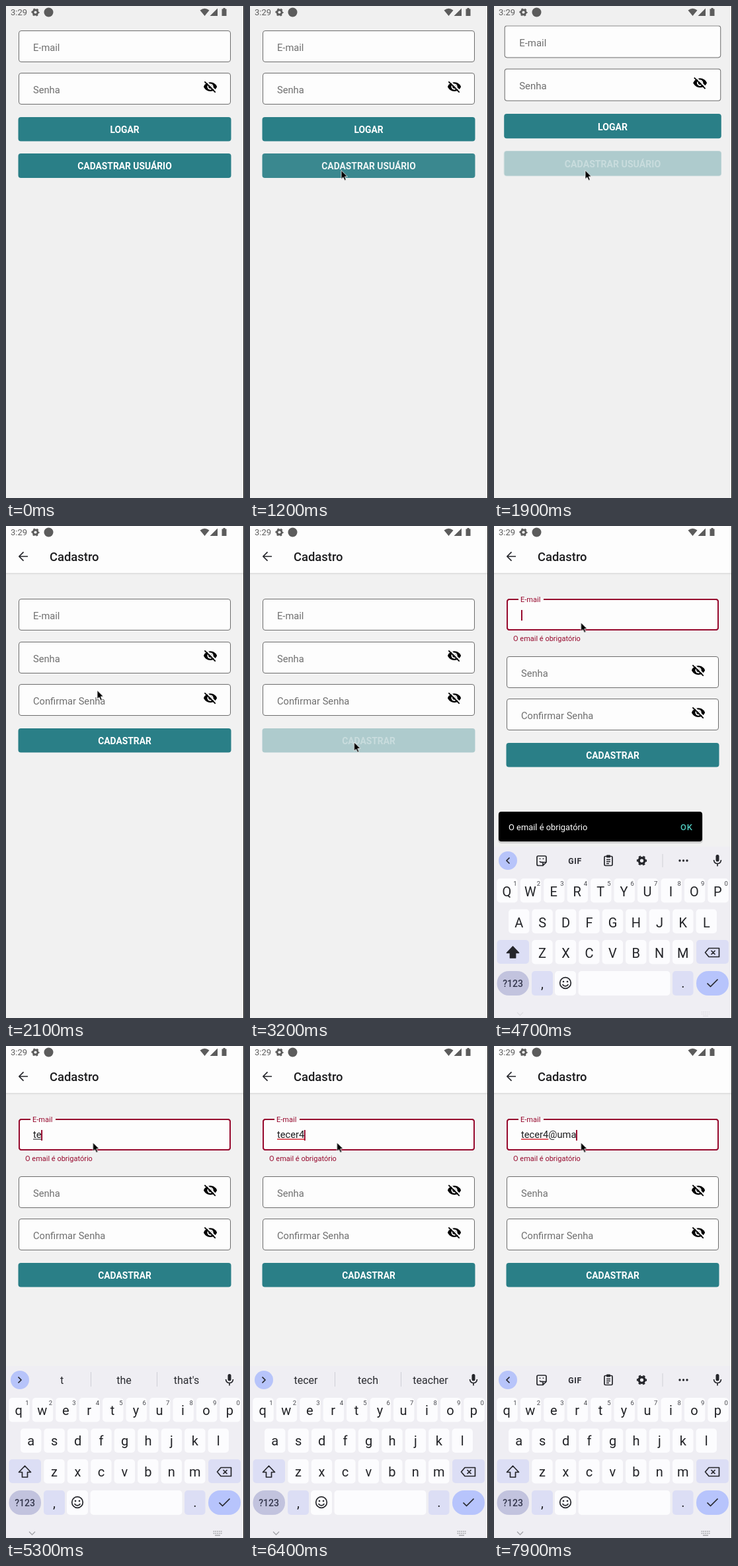
These frames come from a looping animation (360 px wide and 744 px high, 8000 ms). An HTML page:

```html
<!DOCTYPE html>
<html lang="pt-BR">
<head>
<meta charset="utf-8">
<title>Cadastro</title>
<style>
  html, body { margin: 0; width: 100%; height: 100%; overflow: hidden; background: #f0f0f0; }
  svg { display: block; width: 100vw; height: 100vh; }
  text { font: 14.7px Roboto, "Noto Sans", sans-serif; fill: #6f6f6f; }
  .mid { text-anchor: middle; }
  .box { fill: #fdfdfd; stroke: #6d6d6d; rx: 3.5px; }
  .btn rect { fill: #2a7f87; rx: 4px; }
  .btn text { font-size: 13.85px; font-weight: 700; fill: #fff; }
  .line { fill: none; stroke: #25262b; stroke-width: 1.7; stroke-linejoin: round; }
  .ink { fill: #25262b; }
  .grey { fill: #5c5c5c; }
  #title { font-size: 18.4px; font-weight: 500; fill: #1d1d1f; }
  #caption { font-size: 11px; fill: #970a2e; }
  #typed { fill: #1d1d1f; white-space: pre; }
  #snack text { font-size: 12.9px; fill: #fff; }
  #snack .ok { font-weight: 500; letter-spacing: .9px; fill: #4fc9bd; }
  .cap { fill: #fcfcfe; rx: 5px; }
  .soft { fill: #dcdef5; }
  .pill { rx: 18px; }
  .letter { font-size: 20px; fill: #222327; text-anchor: middle; }
  .digit { font-size: 9.5px; fill: #44454b; text-anchor: middle; }
  .word { font-size: 16px; fill: #2b2c31; text-anchor: middle; }
  #gifKey { font-size: 12.3px; font-weight: 700; letter-spacing: .6px; fill: #303137; }
  #modeKey { font-size: 14px; font-weight: 500; fill: #33364c; }

  .anim, .press > * { animation: 8s linear infinite; }
  .step { animation-timing-function: step-end; }

  #pointer { animation-name: pointer; }
  @keyframes pointer {
    0% { opacity: 0; transform: translate(60px, 378px); animation-timing-function: step-end; }
    1.1% { opacity: 1; transform: translate(60px, 378px); animation-timing-function: ease-out; }
    5%, 10.6% { transform: translate(125px, 295px); animation-timing-function: ease-in-out; }
    12.4%, 28.75% { transform: translate(138px, 248.5px); animation-timing-function: ease-in-out; }
    34%, 46.8% { transform: translate(157.5px, 327px); animation-timing-function: ease-in-out; }
    52.4%, 100% { opacity: 1; transform: translate(131.5px, 146px); }
  }

  #openBtn > * { animation-name: openPress; }
  @keyframes openPress { 0%, 14.6% { opacity: 1; } 18%, 100% { opacity: .33; } }
  #sendBtn > * { animation-name: sendPress; }
  @keyframes sendPress { 0%, 34.6% { opacity: 1; } 37.5%, 42% { opacity: .33; } 44.4%, 100% { opacity: 1; } }

  #login { transform-origin: 180px 408px; animation-name: leave; }
  @keyframes leave { 0%, 22.6% { transform: scale(1); } 23.75% { transform: scale(1.02); } 26%, 100% { transform: scale(1.08); } }
  #register { transform-origin: 180px 408px; animation-name: enter; }
  @keyframes enter {
    0%, 23.85% { opacity: 0; transform: scale(.9); animation-timing-function: ease-out; }
    26.1%, 100% { opacity: 1; transform: scale(1); }
  }

  #lower { animation-name: lower; }
  @keyframes lower { 0% { transform: none; } 42.2%, 100% { transform: translateY(22px); } }
  #caption { animation-name: caption; }
  @keyframes caption { 0% { opacity: 0; } 42.2%, 100% { opacity: 1; } }
  #mailBox { animation-name: mailBox; }
  @keyframes mailBox { 0% { stroke: #6d6d6d; } 42.2%, 100% { stroke: #970a2e; } }
  #mailLabel { animation-name: mailLabel; }
  @keyframes mailLabel {
    0% { fill: #6f6f6f; transform: translate(41px, 140.5px); animation-timing-function: step-end; }
    42.2%, 56.2% { fill: #970a2e; transform: translate(41px, 140.5px); }
    58.1%, 100% { fill: #970a2e; transform: translate(40px, 115px) scale(.75); }
  }
  .focus { animation-name: focus; }
  @keyframes focus { 0% { opacity: 0; } 56.2%, 100% { opacity: 1; } }

  #lift { animation-name: lift; }
  @keyframes lift {
    0%, 56.2% { transform: none; animation-timing-function: ease-out; }
    58.4%, 100% { transform: translateY(-260px); }
  }
  #snack { transform-origin: 161px 714px; animation-name: snack; }
  @keyframes snack {
    0%, 42.3% { opacity: 0; transform: scale(.9); }
    44.7%, 63.5% { opacity: 1; transform: none; }
    65.5%, 100% { opacity: 0; transform: none; }
  }

  #keyboard { animation-name: keyboard; }
  @keyframes keyboard {
    0%, 56.2% { transform: translateY(260px); animation-timing-function: ease-out; }
    58.4%, 59% { transform: none; }
    61%, 100% { transform: translateY(-1px); }
  }
  #nav { animation-name: nav; }
  @keyframes nav { 0%, 58.7% { opacity: .2; } 66%, 100% { opacity: 1; } }
  .upper { animation-name: upper; }
  @keyframes upper { 0% { opacity: 1; } 63.2%, 100% { opacity: 0; } }
  .lowercase { animation-name: lowercase; }
  @keyframes lowercase { 0% { opacity: 0; } 63.2%, 100% { opacity: 1; } }
  #shift { animation-name: shift; }
  @keyframes shift { 0% { fill: #25262b; } 63.2%, 100% { fill: transparent; } }
  #tools { animation-name: tools; }
  @keyframes tools { 0% { opacity: 1; } 63.2% { opacity: 0; } 85.8%, 100% { opacity: 1; } }
  #words { animation-name: words; }
  @keyframes words { 0% { opacity: 0; } 63.2% { opacity: 1; } 85.8%, 100% { opacity: 0; } }
  #chevron { transform-origin: 21px 506px; animation-name: chevron; }
  @keyframes chevron { 0% { transform: none; } 63.2% { transform: scaleX(-1); } 85.8%, 100% { transform: none; } }
</style>
</head>
<body>
<svg viewBox="0 0 360 744">
  <defs>
    <linearGradient id="shade" x2="0" y2="1">
      <stop stop-color="#d9d9d9"/><stop offset="1" stop-color="#f1f1f1"/>
    </linearGradient>
    <g id="eye">
      <path d="M1 12C2.7 7.6 7 4.5 12 4.5S21.3 7.6 23 12C21.3 16.4 17 19.5 12 19.5S2.7 16.4 1 12Z"/>
      <circle cx="12" cy="12" r="5" fill="#fdfdfd"/>
      <circle cx="12" cy="12" r="3"/>
      <path d="M4 1.6L22.4 20" stroke="#fdfdfd" stroke-width="2.2"/>
      <path d="M2.6 3.6L20.4 21.4" stroke="#000" stroke-width="1.9"/>
    </g>
    <g id="gear" fill="none">
      <circle r="3.5" stroke-width="2.8"/>
      <circle r="5.3" stroke-width="1.6" stroke-dasharray="2.8 2.75" stroke-dashoffset="1.4"/>
    </g>
  </defs>

  <rect width="360" height="744" fill="#f0f0f0"/>

  <g id="login" class="anim">
    <g id="loginFields"></g>
    <g class="btn"><rect x="18.5" y="168" width="322" height="36.5"/><text class="mid" x="179.5" y="192">LOGAR</text></g>
    <g class="btn press" id="openBtn"><rect x="18.5" y="223" width="322" height="37"/><text class="mid" x="179.5" y="247">CADASTRAR USUÁRIO</text></g>
  </g>

  <g id="register" class="anim">
    <rect x="-30" y="-60" width="420" height="860" fill="#f1f1f1"/>
    <rect x="-30" y="-60" width="420" height="131" fill="#fdfdfd"/>
    <rect y="71" width="360" height="3" fill="url(#shade)"/>
    <path class="line" d="M33 46H20M26.5 39.3L19.8 46L26.5 52.7"/>
    <text id="title" x="66" y="53">Cadastro</text>

    <rect id="mailBox" class="box anim step" x="19.5" y="110.5" width="320" height="47"/>
    <g class="focus anim step">
      <rect x="20" y="111" width="319" height="46" rx="3.5" fill="none" stroke="#970a2e" stroke-width="2"/>
      <rect x="37" y="109" width="38" height="4" fill="#f7f7f7"/>
      <rect id="caret" x="41" y="127" width="2" height="16" fill="#970a2e"/>
    </g>
    <text id="mailLabel" class="anim">E-mail</text>
    <text id="caption" class="anim step" x="29" y="174">O email é obrigatório</text>
    <path id="spell" fill="none" stroke-width="1.4"/>
    <text id="typed" x="41" y="139"></text>

    <g id="lower" class="anim step">
      <g id="passFields"></g>
      <g class="btn press" id="sendBtn"><rect x="18.5" y="306" width="322" height="36.5"/><text class="mid" x="179.5" y="330">CADASTRAR</text></g>
    </g>
  </g>

  <g id="lift" class="anim">
    <g id="snack" class="anim">
      <rect x="6" y="693" width="310" height="47" rx="5" opacity=".14"/>
      <rect x="7" y="692" width="308" height="45" rx="4"/>
      <text x="22" y="720">O email é obrigatório</text>
      <text class="ok" x="282" y="720">OK</text>
    </g>
  </g>

  <g id="keyboard" class="anim">
    <rect y="485" width="360" height="262" fill="#efeef3"/>
    <circle cx="21" cy="506" r="14" fill="#b7c4fa"/>
    <path id="chevron" class="line anim step" d="M23.5 501.5L19 506L23.5 510.5"/>
    <g id="tools" class="anim step">
      <g class="line">
        <path d="M74 513.5H67Q65 513.5 65 511.5V501Q65 499 67 499H77Q79 499 79 501V508.5L74 513.5V508.5H79M69 507Q71 509.5 73.5 508"/>
        <path d="M69.5 502.5V504M74.5 502.5V504"/>
        <rect x="167" y="499.5" width="12" height="14" rx="1.5"/>
        <path d="M170 504.5H176M170 507.5H176M170 510.5H174" stroke-width="1.3"/>
      </g>
      <rect class="ink" x="170" y="497.5" width="6" height="4" rx="1"/>
      <text id="gifKey" class="mid" x="122.5" y="510.5">GIF</text>
      <use href="#gear" transform="translate(223.5 506) scale(1.25)" stroke="#25262b"/>
      <rect x="254.5" y="496" width="1" height="20" fill="#cfcfd6"/>
      <g class="ink"><circle cx="281" cy="506" r="1.7"/><circle cx="286.5" cy="506" r="1.7"/><circle cx="292" cy="506" r="1.7"/></g>
    </g>
    <g id="words" class="anim step">
      <text class="word" x="84.5" y="512"></text>
      <text class="word" x="178.5" y="512"></text>
      <text class="word" x="273" y="512"></text>
      <path d="M128.5 494V516M228.5 494V516" stroke="#cfcfd6"/>
    </g>
    <rect class="ink" x="335.5" y="497" width="5" height="10.5" rx="2.5"/>
    <path class="line" d="M332.5 505Q333 510.5 338 510.5T343.5 505M338 510.5V514.5"/>

    <g id="keys"></g>
    <rect class="cap soft" x="4.5" y="626" width="48.5" height="36"/>
    <path id="shift" class="line anim step" d="M28.5 636L37.5 645.5H32.5V653H24.5V645.5H19.5Z"/>
    <rect class="cap soft" x="306" y="626" width="49" height="36"/>
    <path class="line" d="M325 638.5H340.5V651.5H325L319.5 645ZM328.5 642L334.5 648M334.5 642L328.5 648"/>
    <rect class="cap pill" x="4.5" y="673" width="48.5" height="37" style="fill:#c2c3de"/>
    <text id="modeKey" class="mid" x="28.5" y="696.5">?123</text>
    <rect class="cap soft" x="57" y="673" width="32" height="37"/>
    <text class="letter" x="73" y="699">,</text>
    <rect class="cap" x="92" y="673" width="32" height="37"/>
    <circle class="line" cx="108" cy="691" r="8.3"/>
    <circle class="ink" cx="105" cy="689" r="1.3"/><circle class="ink" cx="111" cy="689" r="1.3"/>
    <path class="line" d="M103.7 693Q105 695.8 108 695.8T112.3 693" stroke-width="1.5"/>
    <rect class="cap" x="127.5" y="673" width="139" height="37"/>
    <rect class="cap soft" x="270" y="673" width="31.5" height="37"/>
    <text class="letter" x="286" y="698">.</text>
    <rect class="cap pill" x="306" y="673" width="49" height="37" style="fill:#b7c4fc"/>
    <path class="line" d="M322.5 691.5L327.5 696.5L338.5 685.5"/>
    <g id="nav" class="anim" fill="none" stroke="#a5a5aa">
      <path d="M35 735.5L39.5 740L44 735.5" stroke-width="1.3"/>
      <path d="M313.5 735H326.5M313.5 738H326.5" stroke-width="1.7" stroke-dasharray="1.8 1"/>
      <path d="M316 741H324" stroke-width="1.5"/>
    </g>
  </g>

  <g>
    <text x="7" y="14" style="font-size:13px;fill:#5c5c5c">3:29</text>
    <use href="#gear" transform="translate(44.5 9.5)" stroke="#5c5c5c"/>
    <circle class="grey" cx="64.5" cy="9.5" r="7"/>
    <path class="grey" d="M293.5 6.5Q300.5 .8 307.5 6.5L300.5 15ZM308.5 15H320V3.5ZM326.5 4.5H328.5V3H331.5V4.5H333.5V15H326.5Z"/>
  </g>

  <g id="pointer" class="anim">
    <path d="M0 0V13.2L3 10.5L5.2 15.3L7.4 14.3L5.3 9.6H9.4Z" stroke="#fff" stroke-width=".8"/>
  </g>
  <rect x="359" width="1" height="744" fill="#161616"/>
</svg>

<script>
  const $ = id => document.getElementById(id);

  const field = (label, y, secret) =>
    `<rect class="box" x="19.5" y="${y + .5}" width="320" height="47"/>` +
    `<text x="41" y="${y + 30.5}">${label}</text>` +
    (secret ? `<use href="#eye" transform="translate(298 ${y + 10}) scale(.92)"/>` : '');

  $('loginFields').innerHTML = field('E-mail', 37) + field('Senha', 101, true);
  $('passFields').innerHTML = field('Senha', 175, true) + field('Confirmar Senha', 239, true);

  const rows = [['qwertyuiop', 20, 533], ['asdfghjkl', 37.7, 579.5], ['zxcvbnm', 73, 626]];
  const step = 35.45;
  const key = (ch, x, y, digit) => {
    const tx = digit === null ? x : x - .7;
    return `<rect class="cap" x="${x - 15.7}" y="${y}" width="31.4" height="36.5"/>` +
      `<text class="letter upper anim step" x="${tx}" y="${y + 27.2}">${ch.toUpperCase()}</text>` +
      `<text class="letter lowercase anim step" x="${tx}" y="${y + 25.5}">${ch}</text>` +
      (digit === null ? '' : `<text class="digit" x="${x + 12}" y="${y + 11}">${digit}</text>`);
  };
  $('keys').innerHTML = rows.map(([chars, x, y], r) =>
    [...chars].map((ch, i) => key(ch, x + i * step, y, r ? null : (i + 1) % 10)).join('')).join('');

  const entry = 'tecer4@uma';
  const strokes = [5060, 5260, 5360, 5560, 5760, 6160, 6860, 7460, 7660, 7860];
  const wordLength = 6, spellTime = 6360;
  const hints = [
    [0, ['t', 'the', "that's"]],
    [5360, ['te', 'the', 'tell']],
    [5760, ['tecer', 'tech', 'teacher']]
  ];
  const typed = $('typed'), caret = $('caret'), spell = $('spell');
  const words = document.querySelectorAll('.word');

  function draw(t) {
    const n = strokes.filter(s => s <= t).length;
    typed.textContent = entry.slice(0, n);
    const width = n ? typed.getComputedTextLength() : 0;
    caret.setAttribute('x', 41 + width - (n ? .5 : 0));
    const mark = n ? typed.getSubStringLength(0, Math.min(n, wordLength)) : 0;
    spell.setAttribute('d', `M41 141H${41 + mark}`);
    spell.setAttribute('stroke', !n ? 'none' : t < spellTime ? '#55555a' : '#d8232f');
    const hint = hints.filter(h => h[0] <= t).pop()[1];
    words.forEach((w, i) => w.textContent = hint[i]);
  }

  let start;
  function tick(now) {
    start ??= now;
    draw((now - start) % 8000);
    requestAnimationFrame(tick);
  }
  requestAnimationFrame(tick);
</script>
</body>
</html>
```
